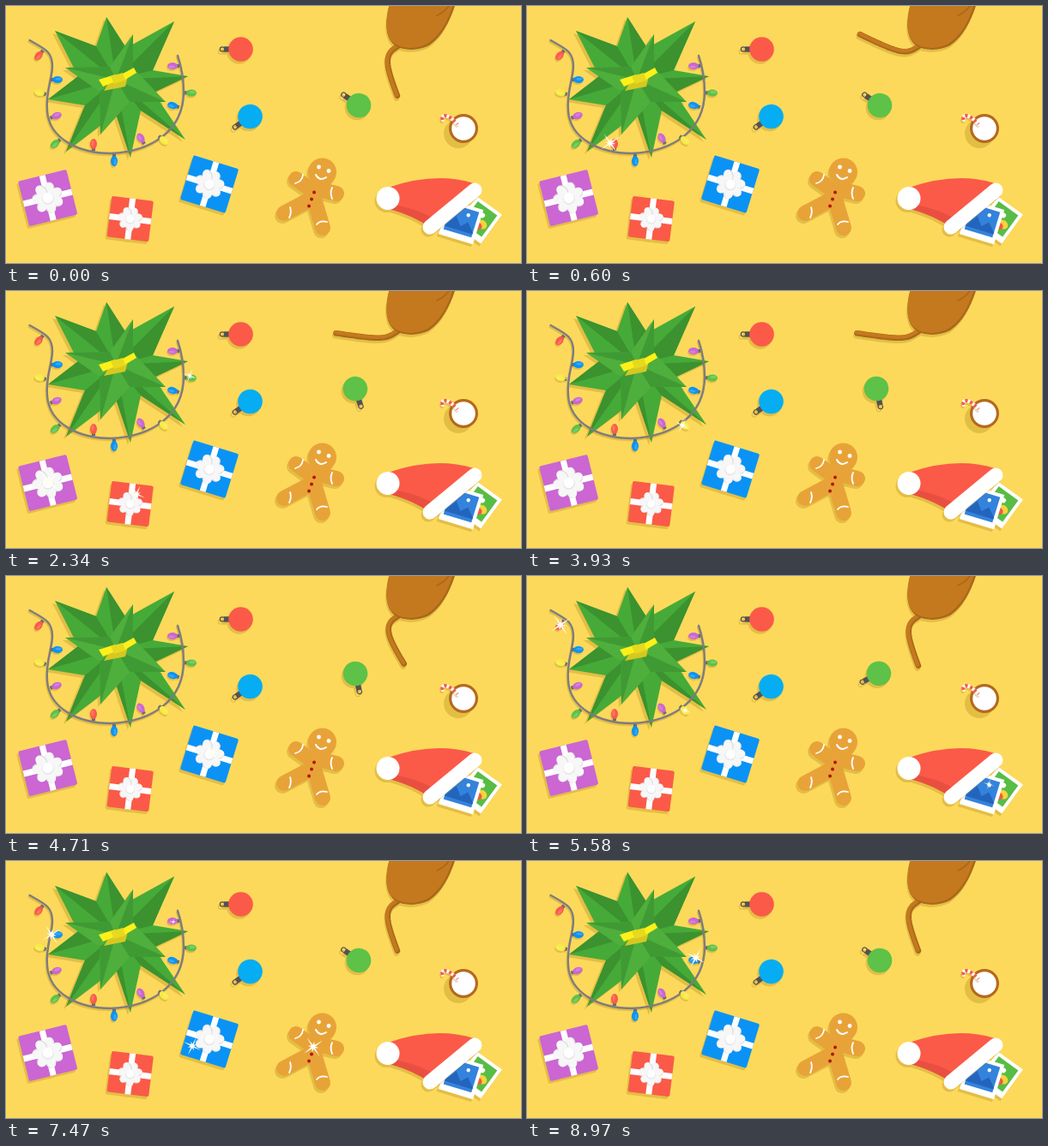
These frames come from a looping animation (600x300 px, 9 s). An HTML page with a canvas:

```html
<!DOCTYPE html>
<html lang="en">
<head>
<meta charset="utf-8">
<style>
html, body { margin: 0; width: 100%; height: 100%; overflow: hidden; background: #fcd95b; }
canvas { display: block; }
</style>
</head>
<body>
<canvas id="stage" width="600" height="300"></canvas>
<script>
const W = 600, H = 300, LOOP = 9000, STEP = 30, TAU = Math.PI * 2;
const RED = '#fb5a48', BLUE = '#0a93f5', GREEN = '#5dc247', PURPLE = '#cb66d3', YELLOW = '#f7ea45';
const rad = deg => deg * Math.PI / 180;

const makeCanvas = () => Object.assign(document.createElement('canvas'), { width: W, height: H });
const screen = document.getElementById('stage').getContext('2d');
const scenery = makeCanvas().getContext('2d');
const layer = makeCanvas().getContext('2d');
const c = layer;

// Draws on a clean layer, then stamps it with one common flat shadow.
function group(target, draw, dx = -2, dy = 3) {
  layer.clearRect(0, 0, W, H);
  draw();
  target.save();
  target.shadowColor = 'rgba(150,105,0,.24)';
  target.shadowOffsetX = dx;
  target.shadowOffsetY = dy;
  target.drawImage(layer.canvas, 0, 0);
  target.restore();
}

function placed(x, y, deg, draw) {
  c.save();
  c.translate(x, y);
  c.rotate(rad(deg));
  draw();
  c.restore();
}

function fill(color, path) {
  c.fillStyle = color;
  c.fill(new Path2D(path));
}

function line(color, width, path) {
  c.strokeStyle = color;
  c.lineWidth = width;
  c.lineCap = c.lineJoin = 'round';
  c.stroke(new Path2D(path));
}

function ellipse(color, x, y, rx, ry = rx) {
  c.fillStyle = color;
  c.beginPath();
  c.ellipse(x, y, rx, ry, 0, 0, TAU);
  c.fill();
}

function rect(color, x, y, w, h) {
  c.fillStyle = color;
  c.fillRect(x, y, w, h);
}

// Points alternate tip, valley, tip, valley; one half of every tip is shaded.
function foliage(cx, cy, pts, light, dark) {
  fill(light, 'M' + pts.join('L') + 'Z');
  for (let i = 0; i < pts.length; i += 2) {
    fill(dark, `M${cx},${cy}L${pts[i]}L${pts[i + 1]}Z`);
  }
}

function tree() {
  foliage(128, 86, [
    [117, 13], [140, 49], [196, 18], [171, 75], [212, 82], [172, 101], [209, 156], [157, 122],
    [145, 177], [128, 126], [70, 170], [92, 116], [49, 109], [84, 82], [57, 29], [105, 47]
  ], '#46aa38', '#3b922f');
  foliage(128, 86, [
    [148, 33], [148, 72], [186, 112], [144, 112], [110, 150], [109, 100], [69, 72], [121, 71]
  ], '#4eaf3c', '#409a33');
  fill('#d6c822', 'M123,84L142,82L139,94L114,99L119,91Z');
  fill('#fff019', 'M108,86L127,80L130,87L113,94ZM134,80L149,72L152,78L137,87Z');
  fill('#e6d91e', 'M122,82L136,78L139,87L126,91Z');
}

function bulb([x, y, deg, color]) {
  placed(x, y, deg, () => {
    rect('#6b6b70', -8, -2, 4, 4);
    ellipse(color, 0, 0, 6, 4);
    ellipse('rgba(255,255,255,.18)', 1, -1, 3.5, 1.5);
  });
}

function lights() {
  line('#7d7c80', 2.4, 'M27.5,40C45,50 54,53 54,70C54,85 46,100 48,122C50,155 85,172 122,172' +
    'C170,170 207,145 207,100C207,82 204,70 200,58');
  [
    [38, 58, 130, RED], [60, 86, 0, BLUE], [39, 101, 195, YELLOW], [59, 128, -20, PURPLE],
    [57, 161, 140, GREEN], [102, 161, -90, RED], [126, 181, 90, BLUE], [157, 154, 240, PURPLE],
    [184, 157, 42, YELLOW], [194, 116, 195, BLUE], [216, 101.5, 2, GREEN], [194, 70, 180, PURPLE]
  ].forEach(bulb);
}

function ornament(x, y, deg, color) {
  placed(x, y, deg, () => {
    rect('#555153', 12, -3.2, 7.5, 6.4);
    c.strokeStyle = '#555153';
    c.lineWidth = 1.2;
    c.beginPath();
    c.arc(21.5, 0, 2.7, 0, TAU);
    c.stroke();
    ellipse(color, 0, 0, 14.3);
  });
}

function gift(x, y, w, h, deg, color, bow) {
  placed(x, y, deg, () => {
    c.fillStyle = color;
    c.beginPath();
    c.roundRect(-w / 2, -h / 2, w, h, 2);
    c.fill();
    rect('#fff', -3.5, -h / 2, 7, h);
    rect('#fff', -w / 2, -3.5, w, 7);
    for (let i = 0; i < 7; i++) {
      placed(0, 0, i * 360 / 7 - 70, () => {
        ellipse('#dededf', bow * .6, .8, bow * .42, bow * .32);
        ellipse('#f7f7f8', bow * .6, -.3, bow * .42, bow * .3);
      });
    }
    ellipse('#e4e4e6', 0, .8, bow * .38);
    ellipse('#fff', 0, 0, bow * .34);
  });
}

function gingerbread() {
  const dough = '#e8a338';
  line(dough, 18, 'M359,217L338,202M360,213L385,219M356,225L324,242M359,225L369,259M363,210L357,226');
  ellipse(dough, 368.5, 194, 16.5);
  line('#fff', 1.8, 'M337,207Q345,205 346,197M380,212Q377,218 380,225M331,235Q333,241 330,247M362,255Q366,250 374,252');
  line('#fff', 2, 'M361,197Q365,205 373,200');
  ellipse('#fff', 364.5, 188, 2.4);
  ellipse('#fff', 376, 192.5, 2.4);
  for (let i = 0; i < 3; i++) ellipse('#b3150f', 359 - i * 3, 217.5 + i * 8, 2);
}

function photo(x, y, deg, w, h, color, picture) {
  placed(x, y, deg, () => {
    rect('#fff', -w / 2, -h / 2, w, h);
    rect(color, -w / 2 + 4, -h / 2 + 4, w - 8, h - 11);
    picture();
  });
}

function greenPhoto() {
  photo(551, 250, 36, 36, 42, '#58bd44', () => {
    ellipse('#f5d33d', 6, 2, 6, 5);
    ellipse('#f05a43', 3, 6, 5, 4);
    ellipse('#fff', 0, -7, 3);
  });
}

function bluePhoto() {
  photo(530, 252, 17, 42, 42, '#3383dc', () => {
    fill('#2364bd', 'M-17,10L-7,-5L1,5L8,-2L17,8V10Z');
    ellipse('#fff', 6, -10, 2.2);
  });
}

function hat() {
  fill(RED, 'M445,212Q500,193 545,207L494,259Q478,246 447,237Z');
  fill('#e94f40', 'M447,231Q482,237 501,250L493,258Q476,245 447,237Z');
  line('#fff', 17, 'M494,258L546,215');
  ellipse('#fff', 445, 224.5, 13.5);
}

function candy() {
  const hook = 'M508.5,133Q507,128 512,128Q518,129 526,138';
  line('#fff', 4, hook);
  c.setLineDash([3, 3]);
  c.lineCap = 'butt';
  c.strokeStyle = '#f45b4b';
  c.stroke(new Path2D(hook));
  c.setLineDash([]);
}

function cup() {
  ellipse('#b5691e', 533, 143, 17);
  ellipse('#fff', 533, 143, 13.8);
}

function paintScenery() {
  scenery.fillStyle = '#fcd95b';
  scenery.fillRect(0, 0, W, H);
  const put = (draw, dx, dy) => group(scenery, draw, dx, dy);
  put(tree, -3, 3);
  put(lights, -1, 2);
  put(() => ornament(273.5, 50.5, 180, RED));
  put(() => ornament(284.5, 129, 145, '#06adf2'));
  put(() => gift(48.7, 224, 58, 54, -14, PURPLE, 18));
  put(() => gift(144.7, 248.5, 49, 48, 7, RED, 14));
  put(() => gift(237, 208, 55, 54, 17, BLUE, 17));
  put(gingerbread);
  put(greenPhoto);
  put(bluePhoto);
  put(hat);
  put(cup, -6, 6);
  put(candy, -1, 2);
}

// Keys are [time, value] pairs joined by sine easing.
function track(keys, t) {
  if (t <= keys[0][0]) return keys[0][1];
  for (let i = 1; i < keys.length; i++) {
    const [t0, a] = keys[i - 1], [t1, b] = keys[i];
    if (t < t1) return a + (b - a) * (1 - Math.cos(Math.PI * (t - t0) / (t1 - t0))) / 2;
  }
  return keys[keys.length - 1][1];
}

const TAIL = [[0, 68], [330, 52], [700, 238], [1000, 186], [1200, 189],
  [4050, 189], [4380, 238], [4750, 52], [5050, 68]];
const ROLL = [[700, 215], [2300, 72], [2700, 77], [4750, 77], [6350, 220], [6750, 215]];

// The heading bends from the fixed root angle towards the aim.
function tailPath(aim) {
  let x = 458, y = 46, path = `M${x},${y}`;
  const length = 66 + (aim - 68) / 15;
  for (let s = 0; s < length; s += 2) {
    const heading = rad(aim + (147 - aim) / (1 + (s / 17) ** 3));
    x += 2 * Math.cos(heading);
    y += 2 * Math.sin(heading);
    path += `L${x},${y}`;
  }
  return path;
}

function dog(aim) {
  const path = tailPath(aim);
  line('#aa681b', 6.6, path);
  placed(-.7, -.9, 0, () => line('#c5791e', 4, path));
  fill('#aa681b', 'M447,-3C441,20 442,38 453,46C464,53 482,52 493,46C508,36 517,18 524,-3Z');
  fill('#c5791e', 'M447,-3C441,20 442,37 453,44C464,51 480,50 491,44C506,34 515,18 521,-3Z');
  line('#aa681b', 1.8, 'M502,11Q510,8 516,0');
}

// Start time, x, y, full radius; each one swells and fades over the same span.
const SPARK_TIME = 800;
const SPARKS = [
  [60, 97, 160, 15], [1230, 36, 58, 16], [1100, 181, 156, 13], [1900, 50, 222, 16],
  [2150, 152, 237, 16], [2200, 214, 99, 16], [3170, 46, 102, 16], [3700, 181, 157, 12],
  [3850, 376, 192, 9], [4200, 240, 206, 14], [5040, 39, 57, 16], [5500, 538, 243, 21],
  [5450, 184, 157, 14], [6000, 99, 162, 16], [6050, 128, 82, 16], [6900, 53, 86, 16],
  [6920, 358, 217, 16], [7270, 217, 216, 16], [7400, 195, 71, 16], [7850, 46, 107, 16],
  [7900, 524, 140, 16], [7920, 357, 203, 16], [8740, 196.5, 113, 16]
];

function sparkle(t, [start, x, y, full]) {
  const p = (t - start) / SPARK_TIME;
  if (p <= 0 || p >= 1) return;
  const r = full * Math.sin(Math.PI * p);
  screen.save();
  screen.translate(x, y);
  screen.rotate(.15 + p * 1.2);
  screen.fillStyle = '#fffdf2';
  screen.beginPath();
  for (let i = 0; i < 16; i++) {
    const reach = i % 2 ? .2 : i % 4 ? .48 : 1;
    screen.lineTo(r * reach * Math.cos(i * TAU / 16), r * reach * Math.sin(i * TAU / 16));
  }
  screen.fill();
  screen.restore();
}

function render(now) {
  const t = Math.floor(now % LOOP / STEP) * STEP;
  const roll = track(ROLL, t), drift = rad(roll - 209);
  screen.drawImage(scenery.canvas, 0, 0);
  group(screen, () => ornament(408.6 + 2.4 * Math.cos(drift), 115.75 + 2.4 * Math.sin(drift), roll, GREEN));
  group(screen, () => dog(track(TAIL, t)), -1, 3);
  SPARKS.forEach(spark => sparkle(t, spark));
}

paintScenery();
const begin = performance.now();
function tick() {
  render(performance.now() - begin);
  requestAnimationFrame(tick);
}
tick();
</script>
</body>
</html>
```
